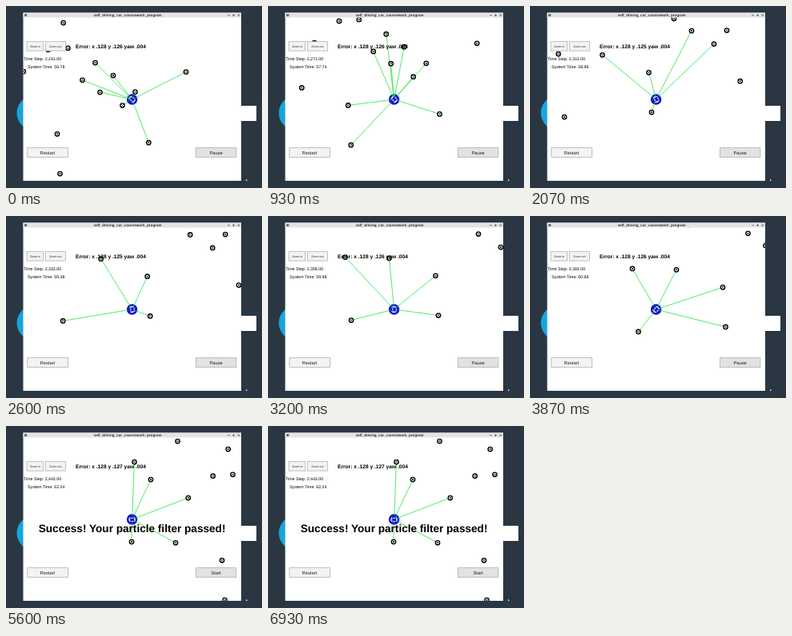
An HTML page that plays this animation: 320x228 px, repeating every 6.99 s.

```html
<!DOCTYPE html>
<html lang="en">
<head>
<meta charset="utf-8">
<title>Particle filter simulator</title>
<style>
  html, body { margin: 0; height: 100%; overflow: hidden; background: #2a3742; }
  svg { display: block; width: 100vw; height: 100vh; }
  text { font-family: "Liberation Sans", Arial, sans-serif; font-size: 5.25px; text-rendering: geometricPrecision; }
  .bold { font-weight: bold; }
  .mid { text-anchor: middle; }
  .button rect { fill: #f3f3f3; stroke: #a5a5a5; stroke-width: .7; }
  .button text { font-size: 5.8px; fill: #222; }
  .button .small { font-size: 3.6px; }
</style>
</head>
<body>
<svg viewBox="0 0 320 228">
  <defs>
    <clipPath id="view"><rect x="21.5" y="14.5" width="272.5" height="204.5"/></clipPath>
    <g id="mark" fill="none" stroke="#000">
      <circle r="2.7" fill="#fff" stroke-width="1.35"/>
      <path d="M-1.2-1.2 1.2 1.2M1.2-1.2-1.2 1.2" stroke-width=".8"/>
    </g>
  </defs>

  <!-- Desktop -->
  <rect width="320" height="228" fill="#2a3742"/>
  <circle cx="35" cy="134" r="21.5" fill="#16a5dc"/>
  <rect x="294" y="125" width="19" height="19" fill="#fff"/>

  <!-- Window -->
  <rect x="21.5" y="8.5" width="272.5" height="210.5" fill="#fff"/>
  <rect x="21.5" y="8.5" width="272.5" height="6" fill="#e4e4e4"/>
  <rect x="23" y="10" width="3.2" height="3" fill="#66717a"/>
  <text class="bold mid" x="152.2" y="12.9" style="font-size:4.62px" fill="#333">self_driving_car_coursework_program</text>
  <path d="M277 11.7h3M283 11.7h3m-1.5-1.5v3M289.5 10.3l2.6 2.6m0-2.6-2.6 2.6" fill="none" stroke="#444" stroke-width=".7"/>

  <g clip-path="url(#view)">
    <circle cx="157.6" cy="117" r="5.5" fill="#dfe3ff" stroke="#0b0bd6" stroke-width="2.5"/>
    <path id="rays" fill="none" stroke="#22e63c" stroke-width=".8"/>
    <g id="car">
      <rect x="-5" y="-2.4" width="10" height="4.8" rx="1.4" fill="#1a1fb4"/>
      <path d="M-2.7-1.5v3M1.7-1.6v3.2" stroke="#e8f2ee" stroke-width="1"/>
    </g>
    <g id="marks"></g>
  </g>

  <g class="button">
    <rect x="26" y="44.7" width="20.7" height="11.4"/>
    <text class="small mid" x="36.5" y="51.9">Zoom in</text>
    <rect x="49.2" y="44.7" width="25.3" height="11.4"/>
    <text class="small mid" x="61.8" y="51.9">Zoom out</text>
    <rect x="26.8" y="177.7" width="50.7" height="11.6"/>
    <text class="mid" x="51.9" y="185.5">Restart</text>
    <rect x="237.3" y="177.7" width="50.6" height="11.6" style="fill:#e2e2e2"/>
    <text class="mid" id="toggle" x="262.6" y="185.5"></text>
  </g>
  <text id="step" x="22" y="68"></text>
  <text id="clock" x="27" y="78"></text>
  <text class="bold" id="error" x="87" y="53.2" style="font-size:6.62px"></text>
  <text class="bold mid" id="success" x="157.6" y="132.6" style="font-size:13.6px">Success! Your particle filter passed!</text>
  <path id="pointer" d="M0 0v2.6l.8-.6 1.2.2z" fill="#fff"/>
</svg>
<script>
const LOOP = 6990, FRAME = 200 / 3, RANGE = 101;
const CAR = [157.6, 117];

// time, map x, map y, step, clock, y error
const keys = [
  [0, 0, 0, 2241, 56.78, 126],
  [933, 36.2, -35.8, 2271, 57.74, 126],
  [2067, 84.5, -77, 2312, 58.86, 125],
  [3200, 145.5, -85.5, 2358, 59.98, 126],
  [3867, 177, -71, 2383, 60.66, 126],
  [4867, 203, -30.5, 2417, 61.64, 127],
  [5466, 206, 8, 2443, 62.24, 127]
];
const END = keys[keys.length - 1][0];

const landmarks = [
  [52.7, 54.7], [71.7, 21], [77.5, 52.8], [21.8, 82], [111.5, 71],
  [95.5, 92.8], [134, 87], [117.5, 108], [161.5, 107.6], [145.5, 124.5],
  [225, 82.6], [178.3, 171.2], [64, 160.3], [67.5, 210], [6, 138.3],
  [-41.5, 216], [-49, 137], [-25, 59], [8.5, 11], [-45.5, 37]
];

const $ = id => document.getElementById(id);
$('marks').innerHTML = landmarks.map(([x, y]) => `<use href="#mark" x="${x}" y="${y}"/>`).join('');

function slope(i, col) {
  const a = keys[Math.max(i - 1, 0)], b = keys[Math.min(i + 1, keys.length - 1)];
  return (b[col] - a[col]) / (b[0] - a[0]);
}

// Smooth cubic curve through the keys
function sample(t, col) {
  let i = 0;
  while (i < keys.length - 2 && t >= keys[i + 1][0]) i++;
  const a = keys[i], b = keys[i + 1], h = b[0] - a[0], u = (t - a[0]) / h, v = 1 - u;
  return v * v * ((1 + 2 * u) * a[col] + u * h * slope(i, col)) +
         u * u * ((1 + 2 * v) * b[col] - v * h * slope(i + 1, col));
}

function draw(time) {
  const t = Math.floor((time % LOOP + 5) / FRAME) * FRAME;
  const done = t >= END, now = Math.min(t, END);
  const x = sample(now, 1), y = sample(now, 2);
  const past = Math.max(now - 60, 0);
  const dx = sample(past, 1) - sample(past + 60, 1);
  const dy = sample(past, 2) - sample(past + 60, 2);
  const heading = Math.atan2(dy, dx) * 180 / Math.PI;

  $('marks').setAttribute('transform', `translate(${x} ${y})`);
  $('car').setAttribute('transform', `translate(${CAR}) rotate(${heading})`);
  $('rays').setAttribute('d', landmarks
    .map(p => [p[0] + x, p[1] + y])
    .filter(p => Math.hypot(p[0] - CAR[0], p[1] - CAR[1]) < RANGE)
    .map(p => `M${CAR}L${p}`).join('') || 'M0 0');

  $('step').textContent = `Time Step: ${Math.round(sample(now, 3)).toLocaleString('en-US')}.00`;
  $('clock').textContent = `System Time: ${(Math.round(sample(now, 4) * 50) / 50).toFixed(2)}`;
  $('error').textContent = `Error: x .128 y .${Math.round(sample(now, 5))} yaw .004`;
  $('toggle').textContent = done ? 'Start' : 'Pause';
  $('success').setAttribute('visibility', done ? 'visible' : 'hidden');
  $('pointer').setAttribute('transform', 'translate(300 216.8)');
}

const start = performance.now();
function tick() {
  draw(performance.now() - start);
  requestAnimationFrame(tick);
}
tick();
</script>
</body>
</html>
```
